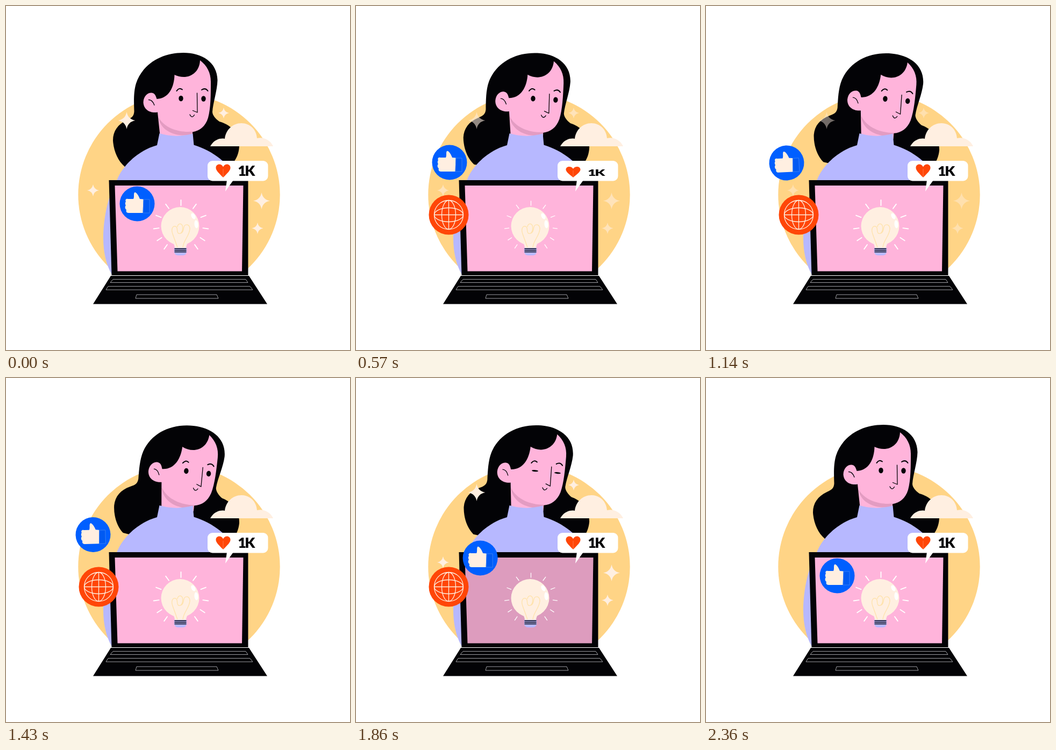
An HTML page that plays this animation: 640 px wide and 640 px high, repeating every 2.43 s.

```html
<!DOCTYPE html>
<html lang="en">
<head>
<meta charset="utf-8">
<title>Idea on a laptop</title>
<style>
  html, body { margin: 0; width: 100%; height: 100%; overflow: hidden; background: #fff; }
  svg { display: block; width: 100%; height: 100%; }
  .ink { fill: #030306; }
  .skin { fill: #ffb4db; }
  .cream { fill: #ffefe1; }
  .lilac { fill: #b7b8ff; }
  .line { fill: none; stroke: #030306; stroke-linecap: round; stroke-linejoin: round; }
  .keys { fill: none; stroke: #c4c4c8; stroke-width: .8; }
  .wire { fill: none; stroke: #ffefe1; stroke-width: 1.3; }
  .count { font: 900 27px Lato, "Noto Sans", sans-serif; letter-spacing: -2.5px; }
</style>
</head>
<body>
<svg viewBox="0 0 640 640">
  <circle cx="322" cy="351" r="187.700" fill="#ffd486"/>

  <g id="head">
    <path class="ink" d="M330 87C289 87 254 108 242 144C237 160 238 180 238.500 196C238 205 234 208 225 212C208 220 199 233 199 250C200 269 208 288 221 299L250 303L424 290C431 280 434 270 434 258C432 234 416 220 397 215C390 210 384 203 384 197C385 180 393 158 393.500 138C393 104 364 87 330 87Z"/>
    <path class="skin" d="M361 101C374 111 381 124 381 141C381 165 381 190 376 208C371 224 361 232 347 234.500V245H287L282 197.500C270 200 256 194 255.500 179C256 167 264 161 271 161.500C277 162 279 168 280.500 173C303 172 313 151 313.500 128C336 139 360 127 361 101Z"/>
    <path d="M283.500 207C296 229 325 236 347 233.500L346 239C318 245 288 234 283.500 207Z" fill="#e39cc2"/>
    <path class="line" stroke-width="1.300" d="M265.500 174.500C271 174.500 274 179 276 184.500M355.500 162L356 198L347.500 194.500M342 202Q346 210 350.500 202.500"/>
    <path class="line" stroke-width="2" d="M317.500 158Q322 151 328 155.500M364 156Q371 151.500 375.500 158"/>
    <ellipse class="ink eye" cx="325.500" cy="172"/>
    <ellipse class="ink eye" cx="367.500" cy="172.500"/>
  </g>

  <path class="lilac" d="M285.500 237Q317 246 347.500 237.500L349.500 258.500C385 270 416 292 430 325V500H197C187 482 181 460 181 432C181 395 190 352 206 325C217 295 248 268 281 259Z"/>
  <path class="cream" d="M380 261C386 250 397 245 407 247C409 230 422 218 438 218C454 218 466 230 467 246C480 243 492 250 497 261Z"/>

  <path class="ink" d="M191.500 324H450.500V501H196.500Z"/>
  <path class="skin" d="M202.500 334H441.500L439 493.500H207.500Z"/>
  <path id="shade" d="M202.500 334H441.500L439 493.500H207.500Z"/>
  <path d="M196 501.500H452" stroke="#fff"/>
  <path class="ink" d="M195 502H452L486 554.500H162Z"/>
  <path class="keys" d="M199 508.500H446L450 514.500H194ZM190 521.500H454L459 528H186ZM243 537H392L395 544H241Z"/>

  <g id="rays" stroke="#fff" stroke-linecap="round"></g>
  <circle class="cream" cx="324" cy="409.500" r="35.500"/>
  <path class="cream" d="M309 438H340Q335 444 335 451H314Q314 444 309 438Z"/>
  <path fill="none" stroke="#ffe3ae" stroke-width="1.400" d="M319 449L310 424C306 413 312 407 317 411C320 414 317 421 321 423C327 425 330 416 328 408C324 402 319 407 319 411M329 449C330 436 341 428 342 415C342 405 333 405 331 411C330 417 329 422 325 423"/>
  <path class="lilac" d="M313 450H336V458Q335 464 328 464H321Q314 464 313 458Z"/>
  <path class="line" stroke-width="1.300" d="M314 451.500H335M314 454.500H335M314 457.500H335"/>
  <g fill="#fff">
    <ellipse cx="348.500" cy="391" rx="3.500" ry="6" transform="rotate(-28 348.500 391)"/>
    <ellipse cx="354" cy="406" rx="3.500" ry="7.500" transform="rotate(-6 354 406)"/>
  </g>

  <rect x="375" y="288" width="112.500" height="37.500" rx="9" fill="#fff"/>
  <path d="M411 324L408 345L423 324Z" fill="#fff"/>
  <g id="heart">
    <path fill="#ff4607" d="M404 319C396 311 390.500 306 390.500 301C390.500 293 401 292 404 299.500C407 292 417.500 293 417.500 301C417.500 306 412 311 404 319Z"/>
    <path d="M404 303V318" stroke="#ff9068" stroke-width=".7"/>
  </g>
  <g id="count"><text class="ink count" x="446" y="316" text-anchor="middle">1K</text></g>

  <g id="stars" class="cream"></g>

  <g id="globe">
    <circle r="37" fill="#ff4607"/>
    <g class="wire">
      <circle r="27"/>
      <ellipse rx="13" ry="27"/>
      <ellipse rx="27" ry="13"/>
      <path d="M0 -27V27M-27 0H27"/>
    </g>
  </g>
  <g id="like">
    <circle r="32.500" fill="#005fff"/>
    <path class="cream" d="M-5 -21C-2 -23 3 -15 5 -9L11.500 -8.500L10.500 17L-16 17C-20 17 -21 14 -20 11C-23 9 -23 5 -21 3C-23 0 -22 -3 -21 -4C-23 -8 -20 -10 -17 -9L-7 -9C-5 -13 -7 -18 -5 -21Z"/>
    <path d="M12 -8H23V17H11Z" fill="#005af2" stroke="#5c93f2" stroke-width=".6"/>
  </g>
</svg>

<script>
const LOOP = 2430, FPS = 14, RAYS = 5;
const $ = id => document.getElementById(id);
const eyes = document.querySelectorAll('.eye');

function set(el, attrs) {
  for (const name in attrs) el.setAttribute(name, attrs[name]);
}
function add(parent, tag, attrs) {
  const el = document.createElementNS('http://www.w3.org/2000/svg', tag);
  set(el, attrs);
  return parent.appendChild(el);
}

function addStar(x, y, r) {
  const w = r * .15;
  add($('stars'), 'path', {
    d: `M0 ${-r}Q${w} ${-w} ${r} 0Q${w} ${w} 0 ${r}Q${-w} ${w} ${-r} 0Q${-w} ${-w} 0 ${-r}Z`,
    transform: `translate(${x} ${y})`
  });
}
addStar(224.5, 213, 16);
addStar(475.5, 362.5, 15.5);
addStar(162, 343, 11);
addStar(405, 199, 10);
addStar(468, 413.5, 10.5);

// Rays fan out from the top and close up toward the socket
const rays = [];
for (let i = -RAYS; i <= RAYS; i++) {
  const n = Math.abs(i);
  const el = add($('rays'), 'line', {
    transform: `translate(325.5 407.5) rotate(${i * (38 - 1.8 * n)})`,
    y1: -36.5 - 1.6 * n
  });
  rays.push({ el, from: 36.5 + 1.6 * n });
}

const ramp = (k, a, b) => Math.min(1, Math.max(0, (k - a) / (b - a)));
// Rises from a to the peak, then falls until b
const tent = (k, a, peak, b) => Math.min(ramp(k, a, peak), ramp(k, b, peak));
// Goes out between a and b, comes back between c and d
const trip = (k, a, b, c, d) => Math.min(ramp(k, a, b), ramp(k, d, c));
const squash = (y, s) => ({ transform: `translate(0 ${y}) scale(1 ${s}) translate(0 ${-y})` });

function draw(k) {
  set($('head'), { transform: `rotate(${7.1 * tent(k, 0, 23, 32)} 321 264)` });
  const blink = tent(k, 24, 26, 28);
  for (const eye of eyes) set(eye, { rx: 4.2 + 1.8 * blink, ry: 5.2 - 3.7 * blink });

  const dim = tent(k, 0, 4, 8) + tent(k, 8, 11.5, 15) + tent(k, 24, 28, 32);
  set($('shade'), { opacity: .27 * dim });
  set($('stars'), { opacity: ramp(k, 4, 0) + tent(k, 4, 11, 20) + tent(k, 20, 26, 33) });

  const power = 1 - tent(k, 3, 8, 13) - tent(k, 20, 26, 32);
  set($('rays'), { 'stroke-width': 1.3 + .6 * power });
  for (const { el, from } of rays) set(el, { y2: -from - 8 - 2 * power });

  set($('heart'), squash(319, 1 - .55 * tent(k, 0, 4, 10)));
  set($('count'), squash(316, 1 - .44 * tent(k, 0, 5.7, 18)));

  // The thumb leaves on a curve, then drifts left and back
  const out = trip(k, 4, 8, 24, 27.5), drift = tent(k, 8, 16, 24);
  const x = 244 - 70 * out * out - 24 * drift, y = 368 - 77 * out + drift;
  set($('like'), { transform: `translate(${x} ${y}) rotate(${-3 * drift})` });

  const slide = trip(k, 4, 7, 27, 30);
  set($('globe'), {
    transform: `translate(${244 - 71.5 * slide} ${430 - 41.5 * slide})`,
    opacity: Math.min(1, slide * 1.5)
  });
}

const start = performance.now();
function tick() {
  const t = (performance.now() - start) % LOOP;
  // Steps begin on whole hundredths of a second
  draw(Math.floor((Math.floor(t / 10) * 10 + 5) * FPS / 1000));
  requestAnimationFrame(tick);
}
tick();
</script>
</body>
</html>
```
